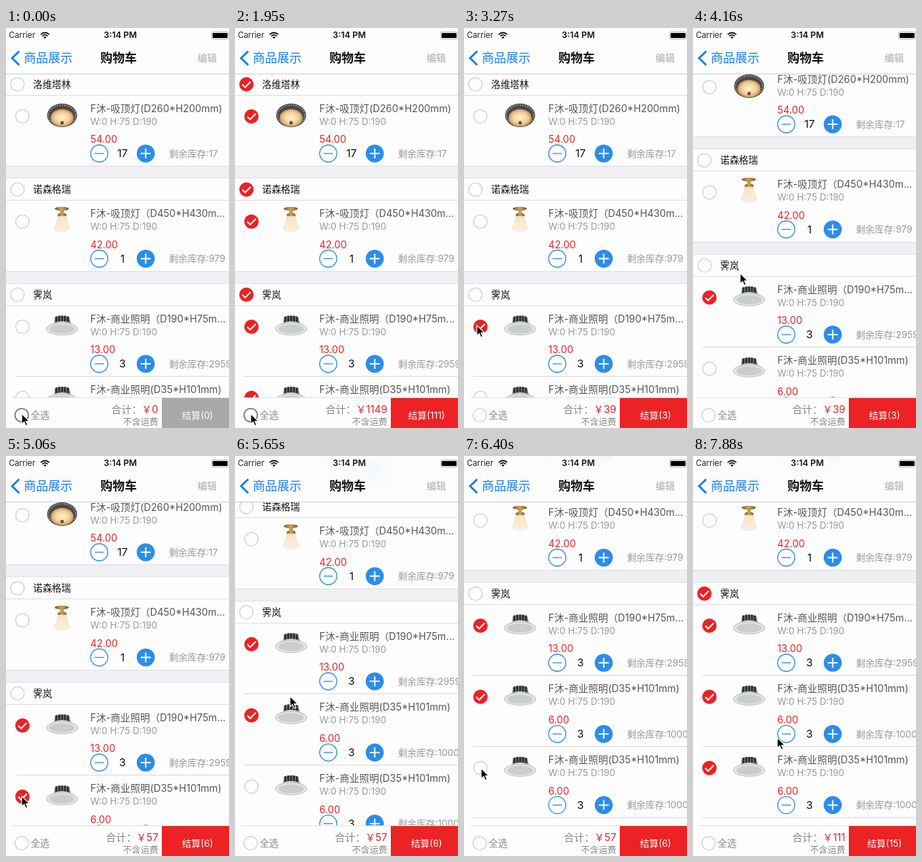
Recreate the animation shown at these times as an HTML page. Size 312 by 561 pixels, loop 8 s.

```html
<!DOCTYPE html>
<html lang="zh-CN">
<head>
<meta charset="utf-8">
<title>购物车</title>
<style>
  html, body { margin: 0; width: 100%; height: 100%; overflow: hidden; background: #fdfdfd; }
  #stage { position: relative; width: 312px; height: 561px; overflow: hidden; }
  svg { position: absolute; left: 0; top: 0; display: block; }
  text { font-family: Inter, "Noto Sans CJK SC", "Noto Sans CJK", sans-serif; white-space: pre; }
  #nav {
    position: absolute; left: 0; top: 0; width: 312px; height: 64px;
    background: rgba(253, 253, 254, .9);
    -webkit-backdrop-filter: blur(12px); backdrop-filter: blur(12px);
  }
  .check .on { display: none; }
  .check.checked:not(.pressed) .on { display: inline; }
  .check .ring { fill: #fefefe; stroke: #d2d2d2; stroke-width: 1.4; }
  .check.pressed .ring { stroke: #777; stroke-width: 1.8; }
</style>
</head>
<body>
<div id="stage">
  <svg width="312" height="561">
    <defs>
      <radialGradient id="amber" cx=".5" cy=".5" r=".55">
        <stop offset="0" stop-color="#fff3d2"/>
        <stop offset=".6" stop-color="#f1cf96"/>
        <stop offset="1" stop-color="#bd8650"/>
      </radialGradient>
      <linearGradient id="glass" x1="0" y1="0" x2="0" y2="1">
        <stop offset="0" stop-color="#efe2d2"/>
        <stop offset=".5" stop-color="#fdebc9"/>
        <stop offset="1" stop-color="#f3efec"/>
      </linearGradient>
      <linearGradient id="brass">
        <stop offset="0" stop-color="#7d571f"/>
        <stop offset=".5" stop-color="#cfa55c"/>
        <stop offset="1" stop-color="#7a511c"/>
      </linearGradient>
      <linearGradient id="steel">
        <stop offset="0" stop-color="#b4b8b5"/>
        <stop offset=".5" stop-color="#e9ebe9"/>
        <stop offset="1" stop-color="#a4a8a5"/>
      </linearGradient>
      <g id="dome">
        <ellipse cy="-1" rx="21" ry="16.5" fill="#4b4644"/>
        <ellipse cy="-1" rx="19" ry="14.4" fill="none" stroke="#a8a29d" stroke-width="1.8" stroke-dasharray="1.6 1.8"/>
        <ellipse cy="2.5" rx="16" ry="12.2" fill="url(#amber)"/>
        <circle cy="9.5" r="2.4" fill="#6a4930"/>
      </g>
      <g id="bell">
        <ellipse cx="-.5" cy="-17.5" rx="10" ry="2.8" fill="url(#brass)"/>
        <path d="M-3-16H3L2-12L6-10V-7H-6V-10L-2-12Z" fill="url(#brass)"/>
        <path d="M-6-7H6Q7.5 4 11.5 10Q8 14 0 14T-11.5 10Q-7.5 4-6-7Z" fill="url(#glass)" stroke="#e6dcd0" stroke-width=".6"/>
      </g>
      <g id="down">
        <path d="M-11-4L-10-13Q0-17 10-13L12-4Z" fill="#747876"/>
        <path d="M-8-14V-6M-4-15V-7M0-15V-7M4-15V-7M8-14V-6" stroke="#222423" stroke-width="2.2"/>
        <path d="M-22 3Q-14-7 0-7T22 3Z" fill="url(#steel)"/>
        <ellipse cy="3.6" rx="22" ry="8.6" fill="#e3e5e3" stroke="#b0b3b1" stroke-width=".8"/>
        <ellipse cy="3.6" rx="17.5" ry="6.4" fill="#c9cecc"/>
      </g>
    </defs>
    <g id="list"></g>
  </svg>
  <div id="nav"></div>
  <svg width="312" height="561">
    <g id="bars"></g>
    <path id="cursor" d="M0 0V14.5L3.4 11.4L5.7 16.8L8.2 15.7L5.9 10.5H10.5Z" fill="#000" stroke="#fff" stroke-width="1.1"/>
  </svg>
</div>
<script>
const $ = id => document.getElementById(id);
const GRAY = '#999', RED = '#e52326', BLUE = '#2c8de6';
const LOOP = 8000, TICK = 148.5;

const text = (x, y, s, size, fill, extra = '') =>
  `<text x="${x}" y="${y}" font-size="${size}" fill="${fill}" ${extra}>${s}</text>`;
const rect = (x, y, w, h, fill, extra = '') =>
  `<rect x="${x}" y="${y}" width="${w}" height="${h}" fill="${fill}" ${extra}/>`;
const check = (id, x, y) =>
  `<g id="${id}" class="check" transform="translate(${x} ${y})"><circle class="ring" r="9.4"/>
   <g class="on"><circle r="10" fill="#ee2024"/>
   <path d="M-5.8.2L-1.8 4.2L6-3.8" fill="none" stroke="#fff" stroke-width="2"/></g></g>`;

const down = { lamp: 'down', price: '6.00', count: 3, stock: 1000, title: 'F沐-商业照明(D35*H101mm)' };
const shops = [
  { name: '洛维塔林', rows: [
    { lamp: 'dome', price: '54.00', count: 17, stock: 17, title: 'F沐-吸顶灯(D260*H200mm)' }] },
  { name: '诺森格瑞', rows: [
    { lamp: 'bell', price: '42.00', count: 1, stock: 979, title: 'F沐-吸顶灯（D450*H430m...' }] },
  { name: '霁岚', rows: [
    { ...down, price: '13.00', stock: 2959, title: 'F沐-商业照明（D190*H75m...' },
    ...Array.from({ length: 4 }, () => ({ ...down }))] },
  { name: '其他', rows: [{ ...down, price: '1.00', count: 78 }] }
];

// Ids nest by prefix: "s" is everything, "s2" a shop, "s2r0" one of its rows.
shops.forEach((shop, s) => {
  shop.id = 's' + s;
  shop.rows.forEach((r, i) => r.id = `${shop.id}r${i}`);
});
const rows = shops.flatMap(shop => shop.rows);
const within = id => rows.filter(r => r.id.startsWith(id));

function rowMarkup(r, y) {
  const c = y + 82;
  return check(r.id, 23, y + 30) +
    `<use href="#${r.lamp}" x="78.5" y="${y + 29.5}"/>` +
    text(118, y + 23.5, r.title, 13.8, '#555') +
    text(118, y + 41.5, 'W:0 H:75 D:190', 12.9, GRAY) +
    text(118, y + 67, r.price, 13.8, RED) +
    `<circle cx="130.5" cy="${c}" r="12" fill="#fff" stroke="${BLUE}" stroke-width="1.3"/>
     <circle cx="195.5" cy="${c}" r="12.6" fill="${BLUE}"/>
     <path d="M124 ${c}h13" stroke="${BLUE}" stroke-width="1.3"/>
     <path d="M188.5 ${c}h14m-7-7v14" stroke="#fff" stroke-width="1.8"/>` +
    text(163, c + 5.3, r.count, 15, '#111', 'text-anchor="middle"') +
    text(228, c + 4.7, '剩余库存:' + r.stock, 13, GRAY);
}

function listMarkup() {
  const HEAD = 30, ROW = 99.8, GAP = 17.7;
  let y = 64, out = '';
  for (const shop of shops) {
    out += check(shop.id, 16, y + 15) + text(38, y + 19.7, shop.name, 13.2, '#111') +
      rect(0, Math.floor(y + HEAD), 312, 1, '#dedede');
    y += HEAD;
    shop.rows.forEach((r, i) => {
      if (i) out += rect(13, Math.round(y - .5), 299, 1, '#d9d9d9');
      out += rowMarkup(r, y);
      y += ROW;
    });
    const top = Math.floor(y);
    out += rect(0, top, 312, 18, '#efeff4') + rect(0, top, 312, 1, '#dedee2') + rect(0, top + 17, 312, 1, '#e2e2e6');
    y += GAP;
  }
  return out;
}

function barsMarkup() {
  return text(4, 14, 'Carrier', 11.3, '#222') +
    `<path d="M48.5 9.2Q54.5 3.8 60.5 9.2M50.7 11.4Q54.5 8 58.3 11.4" fill="none" stroke="#111" stroke-width="1.7"/>
     <path d="M52.5 12.9Q54.5 11.2 56.5 12.9L54.5 15Z" fill="#111"/>` +
    text(160, 14.3, '3:14 PM', 12, '#111', 'text-anchor="middle" font-weight="600"') +
    rect(287.5, 5.5, 24, 10, 'none', 'rx="2" stroke="#999" stroke-width=".7"') +
    rect(289, 7, 21, 7, '#000', 'rx="1"') +
    '<path d="M18.5 32.5L8.5 42.3L18.5 52" fill="none" stroke="#147ef0" stroke-width="2.8"/>' +
    text(25, 48.2, '商品展示', 17, '#147ef0') +
    text(132, 48.2, '购物车', 17, '#111', 'font-weight="600"') +
    text(268, 46.8, '编辑', 13.5, '#aaa') +
    rect(0, 64, 312, 1, '#cdcdd0') +
    rect(0, 518, 312, 43, '#fdfdfd') + rect(8, 518, 304, 1, '#e2e2e2') +
    check('s', 22, 543) + text(34.5, 547.8, '全选', 13.2, '#8a8a8a') +
    `<text x="213" y="540" font-size="14.2" text-anchor="end" fill="#888">合计：<tspan id="sum" fill="${RED}"></tspan></text>` +
    text(213, 556.8, '不含运费', 12.3, '#888', 'text-anchor="end"') +
    rect(218, 519, 94, 42, '#a9a9a9', 'id="pay"') +
    text(268, 547.5, '', 13, '#fff', 'id="payText" text-anchor="middle"');
}

$('list').innerHTML = listMarkup();
$('bars').innerHTML = barsMarkup();
const boxes = [...document.querySelectorAll('.check')];

const stops = [ // arrival, pause, x, y
  [0, 15, 22, 541], [19, 0, 36, 301], [21, 1, 18, 417], [25, 0, 66, 385],
  [28, 2, 66, 344], [33, 1, 22, 477], [36, 0, 77, 450], [38, 0, 77, 337],
  [43, 1, 24, 438], [48, 1, 15, 192], [53, 1, 118, 395]
];
const drags = [ // start, duration, distance
  [25, 3, 41], [36, 4.66, 140]
];
const clicks = [[1, 's'], [14, 's'], [22, 's2r0'], [34, 's2r1'], [44, 's2r2'], [49, 's2']];

const clamp = p => Math.min(1, Math.max(0, p));
const smooth = p => p * p * (3 - 2 * p);
const easeOut = p => 1 - (1 - p) ** 3;

function pointer(k) {
  const i = stops.findLastIndex(s => s[0] <= k);
  const [at, pause, x, y] = stops[i];
  const [end, , x2, y2] = stops[i + 1] ?? stops[i];
  const p = end > at ? smooth(clamp((k - at - pause) / (end - at - pause))) : 0;
  return [x + (x2 - x) * p, y + (y2 - y) * p];
}

const scrollAt = k => Math.round(drags.reduce(
  (sum, [at, time, dist]) => sum + dist * easeOut(clamp((k - at) / time)), 0));

function selection(k) {
  const on = new Set();
  for (const [at, id] of clicks) {
    if (at > k) break;
    const hit = within(id), clear = hit.every(r => on.has(r));
    hit.forEach(r => clear ? on.delete(r) : on.add(r));
  }
  return on;
}

function draw(k) {
  $('cursor').setAttribute('transform', `translate(${pointer(k)})`);
  $('list').setAttribute('transform', `translate(0 ${-scrollAt(k)})`);

  const on = selection(k);
  for (const box of boxes) {
    box.classList.toggle('checked', within(box.id).every(r => on.has(r)));
    box.classList.toggle('pressed', box.id === 's' && clicks.some(([at, id]) => id === 's' && at === k + 1));
  }
  let sum = 0, count = 0;
  for (const r of on) {
    sum += r.price * r.count;
    count += r.count;
  }
  $('sum').textContent = '￥' + sum;
  $('payText').textContent = `结算(${count})`;
  $('pay').setAttribute('fill', count ? '#ec2224' : '#a9a9a9');
}

const start = performance.now();
let shown = -1;
function frame(now) {
  const k = Math.floor(Math.max(0, now - start) % LOOP / TICK);
  if (k !== shown) draw(shown = k);
  requestAnimationFrame(frame);
}
frame(start);
</script>
</body>
</html>
```
